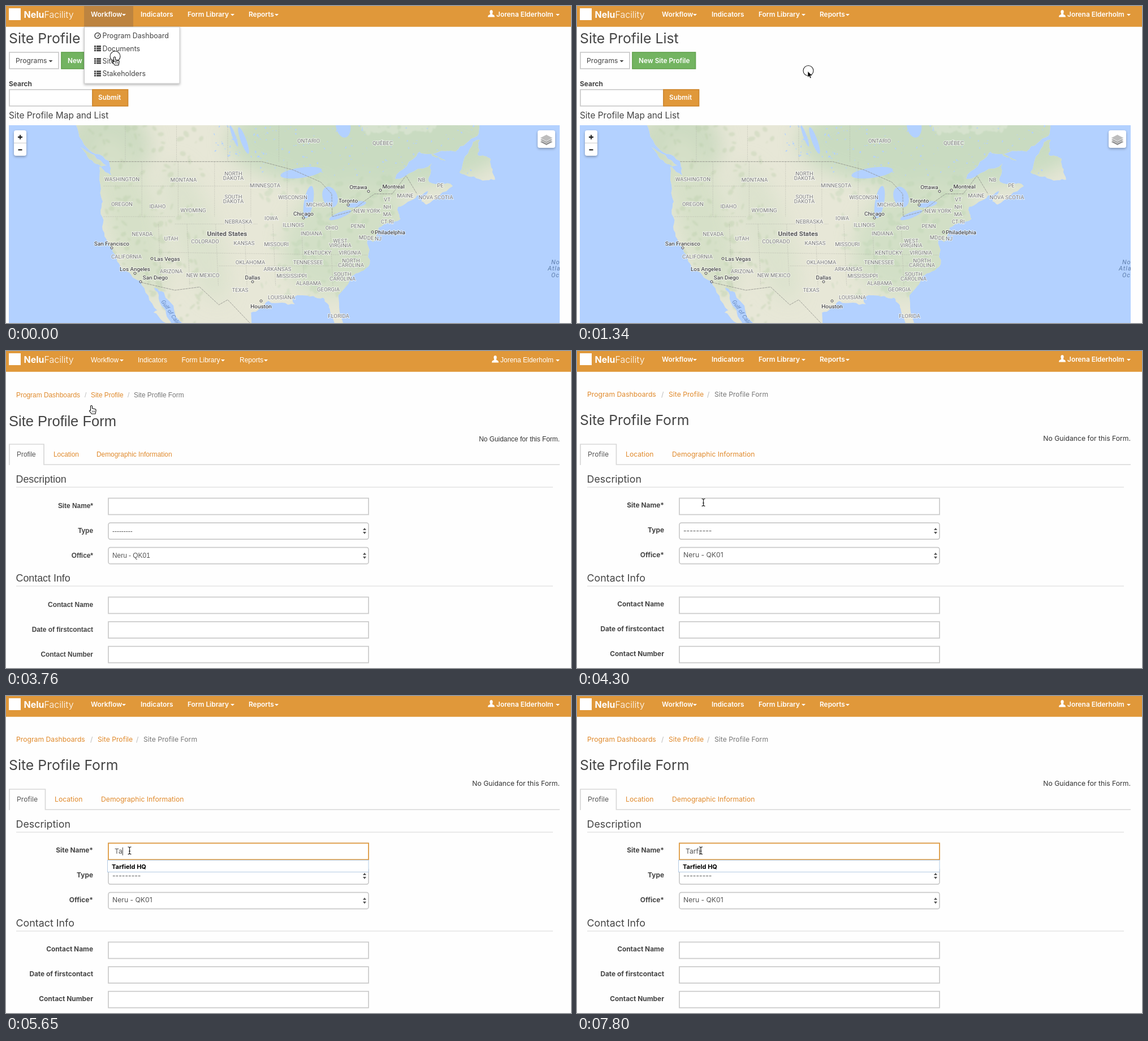
Recreate the animation shown at these times as an HTML page. Size 999 by 561 pixels, loop 8000 ms.

```html
<!DOCTYPE html>
<html lang="en">
<head>
<meta charset="utf-8">
<title>Site profile walkthrough</title>
<style>
html, body { margin: 0; width: 100%; height: 100%; overflow: hidden; background: #fefefe; }
svg { display: block; font-optical-sizing: none; white-space: pre; }
.web { font-family: Inter, "Open Sans", sans-serif; }
.plain { font-family: "Liberation Sans", Arial, sans-serif; }
.map { font-family: Roboto, sans-serif; }
</style>
</head>
<body>
<svg id="stage" width="999" height="561" viewBox="0 0 999 561"></svg>
<script>
const ORANGE = '#e0983a', LINK = '#e08a2c', INK = '#444', LINE = '#cacaca', WATER = '#b3d1ff';
const SIZE = 12.2, ROW = 43.6;
const BOLD = 'font-weight="700"', STRONG = 'font-weight="600"', MIDDLE = 'text-anchor="middle"';

const text = (x, y, s, fill = INK, size = SIZE, extra = '') =>
  `<text x="${x}" y="${y}" fill="${fill}" font-size="${size}" ${extra}>${s}</text>`;
const rect = (x, y, w, h, fill, extra = '') =>
  `<rect x="${x}" y="${y}" width="${w}" height="${h}" fill="${fill}" ${extra}/>`;
const path = (d, extra = '') => `<path d="${d}" ${extra}/>`;
const ellipse = (x, y, rx, ry, turn, fill) =>
  `<ellipse rx="${rx}" ry="${ry}" fill="${fill}" transform="translate(${x} ${y}) rotate(${turn})"/>`;
const box = (x, y, w, h, stroke = LINE, fill = '#fff', extra = '') =>
  rect(x, y, w, h, fill, `stroke="${stroke}" stroke-width="1.7" ${extra}`);
const group = (id, body, cls = '') => `<g id="${id}" class="${cls}">${body}</g>`;
const arrowDown = (x, y, fill) => path(`M${x},${y}h7l-3.5,3.5z`, `fill="${fill}"`);
const repeat = (n, fn) => Array.from({ length: n }, (_, i) => fn(i)).join('');

// ---- Map -------------------------------------------------------------
let seed = 7;
const rand = (a, b) => {
  seed = (seed * 16807) % 2147483647;
  return a + (b - a) * seed / 2147483647;
};

// Mercator projection
const project = (lon, lat) => {
  const m = Math.log(Math.tan(Math.PI / 4 + lat * Math.PI / 360)) * 180 / Math.PI;
  return [526 + (lon + 87.63) * 9.73, 276 + (56.31 - m) * 9.73];
};

// Midpoint displacement turns a few key points into a ragged coast.
const roughen = pts => pts.flatMap((p, i) => {
  const q = pts[i + 1];
  if (!q) return [p];
  const [dx, dy] = [q[0] - p[0], q[1] - p[1]], len = Math.hypot(dx, dy);
  const k = rand(-1, 1) * Math.min(.16, 3 / len);
  return [p, [(p[0] + q[0]) / 2 - dy * k, (p[1] + q[1]) / 2 + dx * k]];
});
const trace = (s, steps = 0) => s.split(';').map(line => {
  let pts = line.trim().split(/\s+/).map(p => project(...p.split(',').map(Number)));
  for (let i = 0; i < steps; i++) pts = roughen(pts);
  return 'M' + pts.map(p => p.map(v => v.toFixed(1))).join('L');
}).join('');

const WEST = `-130.5,54.5 -127.5,51 -123,49.1 -122.5,47.3 -124.7,48.4 -124.1,44 -124.5,42.8 -123.8,39.3
  -122,36.8 -120.6,34.5 -117.2,32.8 -114.2,28.1 -115,27.8 -111,25 -113,28.5 -114.8,31.7 -113,31 -109,25
  -97,25 -97,54.5`;
const EAST = `-98,54.5 -98,25 -97.3,27.7 -94,29.6 -89.2,29.1 -89.6,30.2 -86,30.4 -84,30.1 -82.8,28
  -81.3,25 -80.3,25.5 -81.3,30.5 -79,33.4 -75.6,35.3 -76.3,39.3 -75,38.5 -74,40.5 -70,41.7 -70.5,43.3
  -67,44.8 -64.5,45.8 -66.2,44 -65.3,43.6 -60.5,46 -64.8,46.5 -64.3,48.8 -71,46.9 -66.8,50.1 -60,50.2
  -56,52 -55.7,54.5`;
const ISLANDS = `-59.3,47.7 -56.8,51.3 -55.6,51.5 -56,49.8 -53.6,49.3 -52.8,46.8 -55.8,46.9 -59.3,47.7;
  -128.2,50.7 -123.4,48.5 -125.2,48.7 -128.2,50.7; -64.4,49.9 -61.8,49.1 -64.4,49.9`;
const BORDER = `-123,49 -95.2,49 -89.5,48 -84.5,46.5 -82.5,45 -82.4,42 -79,42.7 -76.5,44.1 -74.7,45 -71.5,45
  -69,47.3 -67,45; -117.1,32.5 -111,31.3 -106.5,31.8 -103,29 -101.4,29.8 -97.2,25.9`;

// State lines follow regular meridians and parallels.
function stateLines() {
  const lines = ['-124,46 -97,46', '-124,42 -111,42', '-114,37 -76,36.6', '-111,41 -96,41', '-103,35 -79,35'];
  for (let lon = -117; lon < -90; lon += 6.6) lines.push(`${lon},49 ${lon},42`);
  for (let lon = -114; lon < -80; lon += 5.2) lines.push(`${lon},41 ${lon + .5},32`);
  for (let lon = -120; lon < -90; lon += 9.3) lines.push(`${lon},54 ${lon},49`);
  return trace(lines.join(';'));
}

const scatter = (n, x0, x1, y0, y1, size, fill) => repeat(n, () => {
  const r = rand(size / 3, size);
  return ellipse(rand(x0, x1), rand(y0, y1), r, r * rand(.3, .8), rand(0, 180), fill);
});

const lakes = () => [
  [522, 295, 37, 9, -8], [535, 347, 8, 29, 10], [573, 338, 13, 19, -20], [591, 370, 21, 5, -22],
  [620, 351, 17, 5, -10], [420, 238, 5, 25, -20], [403, 230, 3, 20, -20], [596, 211, 13, 22, -10]
].map(l => ellipse(...l, WATER)).join('');

const STATES = `WASHINGTON 205 306,MONTANA 314 307,NORTH|DAKOTA 402 296,MINNESOTA 458 317,ONTARIO 535 238,
  QUÉBEC 666 242,OREGON 205 350,IDAHO 268 354,WYOMING 331 361,SOUTH|DAKOTA 402 337,WISCONSIN 507 338,
  MICHIGAN 554 351,NEW YORK 638 362,MAINE 706 335,NB 735 307,PE 768 317,NOVA SCOTIA 760 338,
  NEBRASKA 411 381,IOWA 469 375,ILLINOIS 508 387,INDIANA 540 402,OHIO 576 392,PENN 622 389,NEVADA 241 403,
  UTAH 292 411,COLORADO 352 416,KANSAS 421 419,MISSOURI 478 421,WEST|VIRGINIA 591 415,KENTUCKY 551 436,
  VIRGINIA 608 436,CALIFORNIA 213 443,OKLAHOMA 432 453,TENNESSEE 534 453,NORTH|CAROLINA 610 450,
  ARKANSAS 480 465,ARIZONA 292 469,NEW MEXICO 348 476,MISSISSIPPI 505 477,SOUTH|CAROLINA 595 474,
  ALABAMA 535 490,TEXAS 414 502,GEORGIA 570 501,LOUISIANA 487 515,FLORIDA 588 548`;
const CITIES = 'Toronto 605 352,Chicago 526 375,San Francisco 187 428,Los Angeles 228 473,Dallas 436 488';
const SIDE_CITIES = 'Philadelphia 648 400,Las Vegas 258 447';

const places = (s, fn) => s.split(',').map(p => {
  const [, name, x, y] = p.trim().match(/(.+) (\d+) (\d+)$/);
  return fn(name, +x, +y);
}).join('');

function mapLabels() {
  const halo = 'stroke="#fff" stroke-opacity=".7" stroke-width="2" paint-order="stroke" ';
  const state = (name, x, y) => name.split('|').map((s, i) =>
    text(x, y + 3.5 + i * 8.5, s, '#777', 9.6, halo + MIDDLE)).join('');
  const city = (name, x, y, dx = 0, dy = -8, anchor = MIDDLE) =>
    `<circle cx="${x}" cy="${y}" r="2" fill="#fff" stroke="#444"/>` +
    text(x + dx, y + dy + 3.5, name, '#222', 9.9, halo + anchor);
  const italic = 'font-style="italic" ';
  return places(STATES, state) +
    ['VT', 'NH', 'MA', 'CT RI'].map((s, i) => state(s, 674, 342 + i * 13)).join('') +
    ['MD', 'DE', 'NJ'].map((s, i) => state(s, 631 + i * 13.5, 409 + i)).join('') +
    places(CITIES, city) + places(SIDE_CITIES, (name, x, y) => city(name, x, y, 4, 0, '')) +
    city('Ottawa', 641, 328, -18) + city('Montreal', 662, 326, 23, -7) +
    city('San Diego', 238, 488, 26) + city('Houston', 451, 522, 0, 9) +
    text(391, 407, 'United States', '#555', 11.7, halo + MIDDLE + BOLD) +
    text(0, 0, 'Gulf of California', '#6688bb', 10, italic + 'transform="translate(274 523) rotate(56)"') +
    ['North', 'Atlantic', 'Ocean'].map((s, i) =>
      text(i % 2 ? 958 : 964, 457 + i * 11.3, s, '#5d7dab', 11, italic + 'letter-spacing="1"')).join('');
}

function map() {
  const land = trace([WEST, EAST, ISLANDS].join(';'), 3);
  return `<defs>
    <clipPath id="frame">${rect(5, 211, 974, 350, '#000')}</clipPath>
    <clipPath id="land">${path(land)}</clipPath>
    <filter id="soft" x="-50%" y="-50%" width="200%" height="200%"><feGaussianBlur stdDeviation="16"/></filter>
    <filter id="fuzz"><feGaussianBlur stdDeviation="1.2"/></filter>
    <filter id="shadow" x="-20%" y="-20%" width="140%" height="150%">
      <feDropShadow dx="0" dy="2" stdDeviation="2" flood-opacity=".3"/></filter></defs>
  <g clip-path="url(#frame)" class="map">
    ${rect(5, 211, 974, 350, WATER)}
    <g clip-path="url(#land)">
      ${rect(5, 211, 974, 350, '#e7e7d7')}
      <g filter="url(#soft)">
        ${ellipse(640, 240, 250, 85, 0, '#c9dbc1')}${ellipse(600, 410, 120, 95, -35, '#d2dfc6')}
        ${ellipse(180, 250, 75, 70, 0, '#ccdac1')}${ellipse(220, 370, 150, 45, 72, '#d6e0c8')}
        ${ellipse(335, 400, 130, 38, 70, '#dbe2cd')}
      </g>
      <g opacity=".3" filter="url(#fuzz)">
        ${scatter(220, 110, 350, 211, 561, 7, '#b3c9a2')}${scatter(130, 450, 720, 300, 520, 8, '#b8d2ae')}
        ${scatter(60, 630, 760, 205, 222, 9, '#f6f5ee')}
      </g>
      ${scatter(40, 365, 450, 211, 268, 2.4, WATER)}${scatter(150, 450, 830, 211, 300, 2, WATER)}
      ${lakes()}
      ${path(stateLines(), 'fill="none" stroke="#aaaaa2" stroke-width=".6" stroke-dasharray="3 1" opacity=".6"')}
      ${path(trace(BORDER), 'fill="none" stroke="#8d8d88" stroke-width=".8" stroke-dasharray="4 1"')}
    </g>
    ${mapLabels()}
  </g>`;
}

function mapControls() {
  const raised = 'rx="4" filter="url(#shadow)"';
  return rect(14, 220, 22, 45, '#fff', raised) + path('M14,242.5h22', 'stroke="#ccc"') +
    path('M21,232h8M25,228v8M21.5,254.5h7', 'stroke="#111" stroke-width="1.8"') +
    rect(940, 220, 31, 31, '#fff', raised) +
    ['#8c8c8c', '#a5a5a5', '#bdbdbd'].map((fill, i) =>
      path(`M944,${240.5 - i * 3.5}l11.5,-6 11.5,6 -11.5,6z`, `fill="${fill}" stroke="#fff" stroke-width=".8"`)).join('');
}

// ---- Pages -----------------------------------------------------------
function nav(web) {
  const y = web ? 19 : 20, size = web ? 11.9 : 12, weight = web ? STRONG : '';
  const xs = web ? [150, 238, 321, 429] : [150, 233, 310.5, 413];
  const carets = web ? [205, 397, 475, 972] : [201, 380, 456, 972];
  const user = web ? 852 : 859;
  return ['Workflow', 'Indicators', 'Form Library', 'Reports'].map((s, i) =>
      text(xs[i], y, s, '#fff', size, weight)).join('') +
    carets.map(x => arrowDown(x, y - 5, '#fff')).join('') +
    path(`M${user},${y + .5}q0,-4 4,-4.5v-1.5q-2,-6.5 2,-6.5q4,0 2,6.5v1.5q4,.5 4,4.5z`, 'fill="#fff"') +
    text(user + 15, y, 'Jorena Elderholm', '#fff', size, weight);
}

const brand = rect(5, 4, 21, 21, '#fff') + text(31.5, 20.5,
  '<tspan font-weight="700">Nelu</tspan><tspan font-weight="300">Facility</tspan>', '#fff', 16);

const listPage = text(5, 66, 'Site Profile List', INK, 24.8) +
  box(6, 82, 87, 29) + text(17, 100.5, 'Programs') + arrowDown(75.5, 96, INK) +
  '<rect id="create" x="98" y="82" width="111.5" height="29" stroke-width="1.7"/>' +
  text(109, 100.5, 'New Site Profile', '#fff', 11.8, STRONG) +
  text(5, 142, 'Search', INK, 11.9, BOLD) +
  box(6, 148, 147, 29) + box(153, 148, 62.5, 29, '#cf872c', ORANGE) +
  text(163, 166, 'Submit', '#fff', 11.8, STRONG) +
  text(5, 199, 'Site Profile Map and List', INK, 15.4) + map() + mapControls();

function workflowMenu() {
  const step = 22.2;
  const bars = y => repeat(3, i =>
    rect(156, y + i * 3.7, 3, 2.8, INK) + rect(160, y + i * 3.7, 8, 2.8, INK));
  return rect(138, 0, 87, 37, '#bd8440') + text(150, 19, 'Workflow', '#fff', 11.9, STRONG) +
    arrowDown(205, 14, '#fff') +
    rect(138.5, 37, 168.5, 100, '#fff', 'stroke="#c8c8c8" filter="url(#shadow)"') +
    `<circle cx="162" cy="52.5" r="5" fill="none" stroke="${INK}" stroke-width="1.5"/>` +
    path('M162,54.5l2,-4', `stroke="${INK}" stroke-width="1.5"`) + repeat(3, i => bars(70 + i * step)) +
    ['Program Dashboard', 'Documents', 'Sites', 'Stakeholders'].map((s, i) =>
      text(170.5, 57.3 + i * step, s, INK, 12.4)).join('');
}

function formPage(web) {
  const d = web ? 0 : 1, size = web ? SIZE : 11.9;
  const crumbs = web ? [18, 149, 162, 230, 243] : [18, 139, 150, 215, 226];
  const tabs = web ? [19, 86, 168] : [19, 84, 160];
  const heading = (y, s) => text(17.5, y, s, INK, 17.85) +
    path(`M18,${y + 8}H967`, 'stroke="#e3e3e3" stroke-width="1.5"');
  const select = (y, s) => box(181, y, 460, 29, LINE, '#fff', 'rx="3.5"') +
    text(188, y + 17.5 + d, s, '#555', size) +
    path(`M631,${y + 13}h6l-3,-4zM631,${y + 16}h6l-3,4z`, 'fill="#555"');
  const field = (y, name, value) =>
    text(154, y + 16.8 + d, name, INK, 11.9, BOLD + ' text-anchor="end"') +
    (value ? select(y, value) : box(181, y, 460, 29));
  const fields = (y, rows) => rows.map((row, i) => field(y + i * ROW, ...row)).join('');

  return ['Program Dashboards', '/', 'Site Profile', '/', 'Site Profile Form'].map((s, i) =>
      text(crumbs[i], 81 + d, s, s === '/' ? '#bbb' : i === 4 ? '#777' : LINK, size)).join('') +
    text(5, web ? 131 : 133, 'Site Profile Form', INK, web ? 24.8 : 25.5) +
    text(979, 159 + d, 'No Guidance for this Form.', '#333', size, 'text-anchor="end"') +
    path(`M5,201H6V165H${web ? 69.5 : 67}V201H979`, 'fill="none" stroke="#d8d8d8" stroke-width="1.7"') +
    ['Profile', 'Location', 'Demographic Information'].map((s, i) =>
      text(tabs[i], 187, s, i ? LINK : '#555', size)).join('') +
    heading(233, 'Description') +
    fields(260.5, [['Site Name*'], ['Type', '---------'], ['Office*', 'Neru - QK01']]) +
    heading(408, 'Contact Info') +
    fields(435.5, [['Contact Name'], ['Date of firstcontact'], ['Contact Number']]);
}

const SITES = ['Tarfield HQ', 'Teacher Training Center', 'Temporary Shelter', 'Tool Depot', 'Town Hall', 'Tree Nursery'];
const suggest = n => rect(179.5, 290.5, 461.5, 21 + (n - 1) * 20.6, '#fff', 'stroke="#b4cbe4"') +
  SITES.slice(0, n).map((s, i) => text(187, 306 + i * 20.6, s, '#000', 11, BOLD)).join('');

const entry = box(181, 260.5, 460, 29, ORANGE) +
  `<text id="typed" x="192" y="279" fill="#555" font-size="${SIZE}"></text>` +
  '<rect id="caret" y="268" width="1" height="14" fill="#444"/>';

const pointers =
  group('hand', path('M-1.5,1q1.5,-2 3,0v4l5,1.3q2,.5 1.5,3l-1,5.5h-6.5l-4,-5q0,-2 2,-1z',
    'fill="#fff" stroke="#111" stroke-width="1.1"') +
    path('M1.5,9v3M3.7,9v3M5.5,9v3', 'stroke="#111" stroke-width=".7"')) +
  group('arrow', path('M0,0v11l2.5,-2.5 1.7,4 2,-.9 -1.7,-3.8h3.5z', 'fill="#000" stroke="#fff" stroke-width=".7"')) +
  group('beam', path('M-3,-6.5q3,0 3,2v9q0,2 -3,2M3,-6.5q-3,0 -3,2v9q0,2 3,2M-1.5,1h3',
    'fill="none" stroke="#222" stroke-width="1.2"')) +
  '<circle id="ring" r="9" fill="none" stroke="#222" stroke-width="1.1"/>';

const $ = id => document.getElementById(id);
$('stage').innerHTML = rect(0, 0, 999, 36.8, ORANGE) +
  group('brand', brand, 'web') + group('navWeb', nav(true), 'web') + group('navPlain', nav(false), 'plain') +
  group('list', listPage, 'web') + group('menu', workflowMenu(), 'web') +
  group('formPlain', formPage(false), 'plain') + group('formWeb', formPage(true), 'web') +
  group('entry', entry, 'web') + group('one', suggest(1), 'web') + group('many', suggest(6), 'web') + pointers;

// ---- Timeline --------------------------------------------------------
// time, pointer, x, y
const MOVES = [
  [0, 'hand', 192, 90], [270, 'hand', 193, 101], [800, 'arrow', 407, 118], [1340, 'arrow', 408, 115.5],
  [1610, 'hand', 165, 85], [1880, 'hand', 151, 97], [2140, 'hand', 151, 96.5],
  [4300, 'beam', 223.5, 268], [4570, 'beam', 218.5, 273.5], [6730, 'beam', 219, 273.5]];
// time, letters typed so far
const WORD = 'Tarfina';
const TYPING = [[0, 0], [5380, 1], [5650, 2], [5920, 3], [6190, 5], [6460, 7], [7000, 6], [7270, 5]];

const at = (steps, t) => steps.findLast(s => s[0] <= t);
const during = (t, from, to) => t >= from && t < to;
const show = (id, on) => { $(id).style.display = on ? '' : 'none'; };

function draw(now) {
  const t = now % 8000;
  const onForm = t >= 3760, plain = during(t, 3760, 4030);
  show('list', !onForm);
  show('menu', t < 1340);
  show('navPlain', plain);
  show('navWeb', !plain);
  show('formPlain', plain);
  show('formWeb', onForm && !plain);
  show('entry', t >= 4840);

  const hover = t >= 1610;
  $('create').setAttribute('fill', hover ? '#5b9843' : '#73b461');
  $('create').setAttribute('stroke', hover ? '#467d33' : '#64a451');

  const typed = at(TYPING, t)[1];
  show('many', typed === 1);
  show('one', during(typed, 2, 6) && t >= 5650);
  $('typed').textContent = WORD.slice(0, typed);
  show('caret', t < 7800);
  $('caret').setAttribute('x', 192 + $('typed').getComputedTextLength());

  const [, kind, x, y] = at(MOVES, t);
  for (const id of ['hand', 'arrow', 'beam']) show(id, id === kind);
  $(kind).setAttribute('transform', `translate(${x} ${y})`);
  show('ring', t < 1610 || during(t, 2410, 2680) || during(t, 4840, 5110));
  $('ring').setAttribute('transform', `translate(${x + 1} ${y - 1})`);
  requestAnimationFrame(draw);
}
requestAnimationFrame(draw);
</script>
</body>
</html>
```
